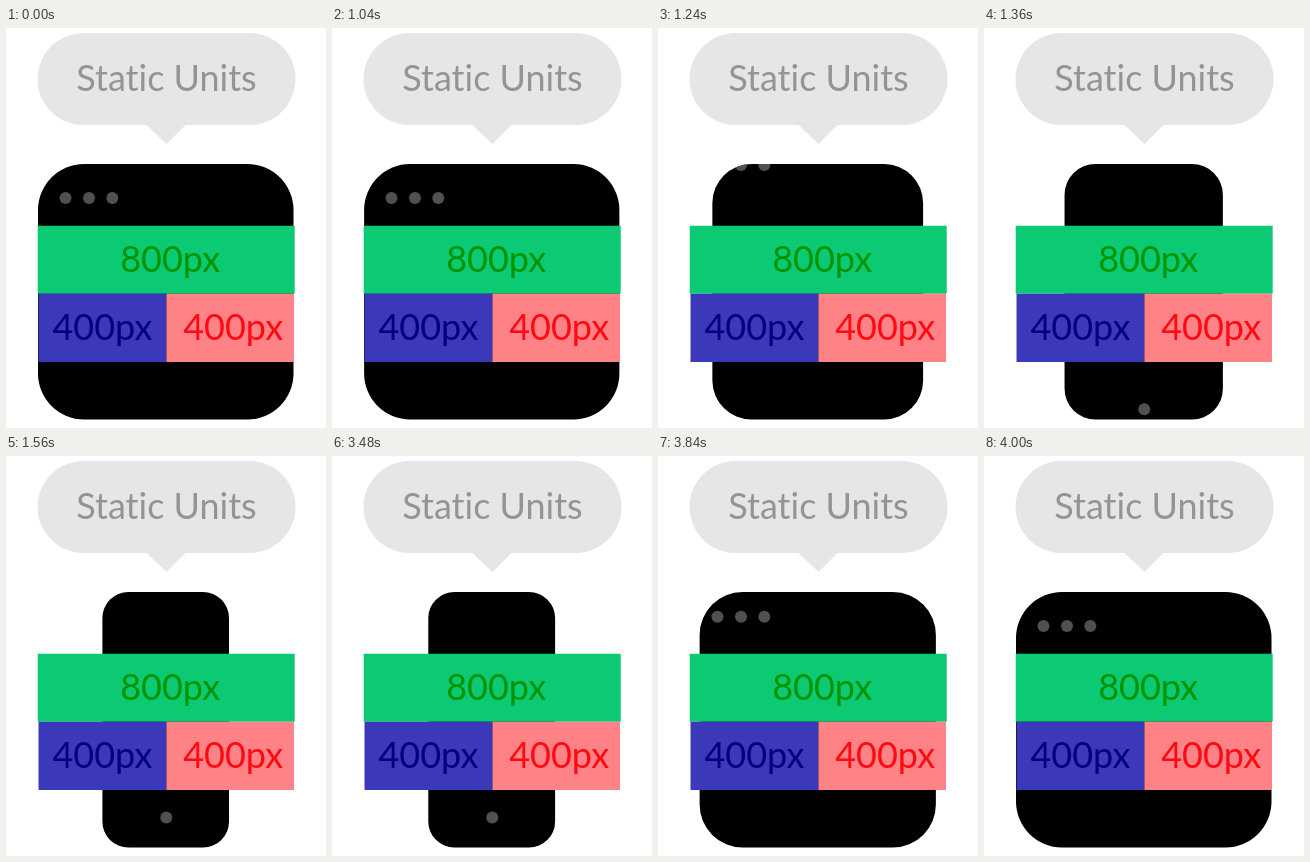
These frames come from a looping animation (320 by 400 pixels, 5.04 s). An HTML page:

```html
<!DOCTYPE html>
<html lang="en">
<head>
<meta charset="utf-8">
<title>Static Units</title>
<style>
  html, body { margin: 0; width: 100%; height: 100%; overflow: hidden; background: #fff; }
  svg { display: block; width: 320px; height: 400px; }
  text {
    font: 36px Lato, "Open Sans", sans-serif;
    font-variant-ligatures: none;
    text-anchor: middle;
  }
</style>
</head>
<body>
<svg viewBox="0 0 320 400">
  <g fill="#e5e6e8">
    <rect x="31.5" y="5" width="258" height="92" rx="46"/>
    <path d="M140 96.5H180L160.5 116Z"/>
  </g>
  <text x="160.5" y="63.3" fill="#929496">Static Units</text>

  <clipPath id="screen"><rect class="device" y="136" height="255.5"/></clipPath>
  <rect class="device" y="136" height="255.5"/>
  <g clip-path="url(#screen)" fill="#505050">
    <g id="dots">
      <circle cx="59.5" cy="170" r="6"/>
      <circle cx="83" cy="170" r="6"/>
      <circle cx="106.3" cy="170" r="6"/>
    </g>
    <circle id="home" cx="160.3" cy="361.5" r="6"/>
  </g>

  <path fill="#0cc974" d="M31.7 197.7H288.7V265.8H31.7Z"/>
  <path fill="#3c38ba" d="M32.5 265.8H160.4V334H32.5Z"/>
  <path fill="#ff8386" d="M160.4 265.8H288V334H160.4Z"/>
  <text x="164.2" y="244.2" fill="#009400">800px</text>
  <text x="96.5" y="312.2" fill="#00007c">400px</text>
  <text x="227.2" y="312.2" fill="#ff0a12">400px</text>
</svg>
<script>
const LOOP = 5040, STEP = 40, DURATION = 516;
const SHRINK_AT = 1025, GROW_AT = 3465, TRAVEL = 114;
const devices = document.querySelectorAll(".device");
const dots = document.getElementById("dots");
const home = document.getElementById("home");

const mix = (a, b, p) => a + (b - a) * p;
const progress = (t, start) => Math.min(1, Math.max(0, (t - start) / DURATION));
const easeInOut = (x, power) => x < 0.5
  ? (2 * x) ** power / 2
  : 1 - (2 - 2 * x) ** power / 2;

function draw(now) {
  const t = Math.floor((now % LOOP) / STEP) * STEP;
  const phone = power =>
    easeInOut(progress(t, SHRINK_AT), power) - easeInOut(progress(t, GROW_AT), power);
  const size = phone(2), slide = phone(3);

  for (const device of devices) {
    device.setAttribute("x", mix(32, 96.4, size));
    device.setAttribute("width", mix(255.5, 126.6, size));
    device.setAttribute("rx", mix(46, 26, size));
  }
  dots.setAttribute("transform", `translate(0 ${-TRAVEL * slide})`);
  home.setAttribute("transform", `translate(0 ${TRAVEL * (1 - slide)})`);
}

const begin = performance.now();
function tick() {
  draw(performance.now() - begin);
  requestAnimationFrame(tick);
}
draw(0);
tick();
</script>
</body>
</html>
```
